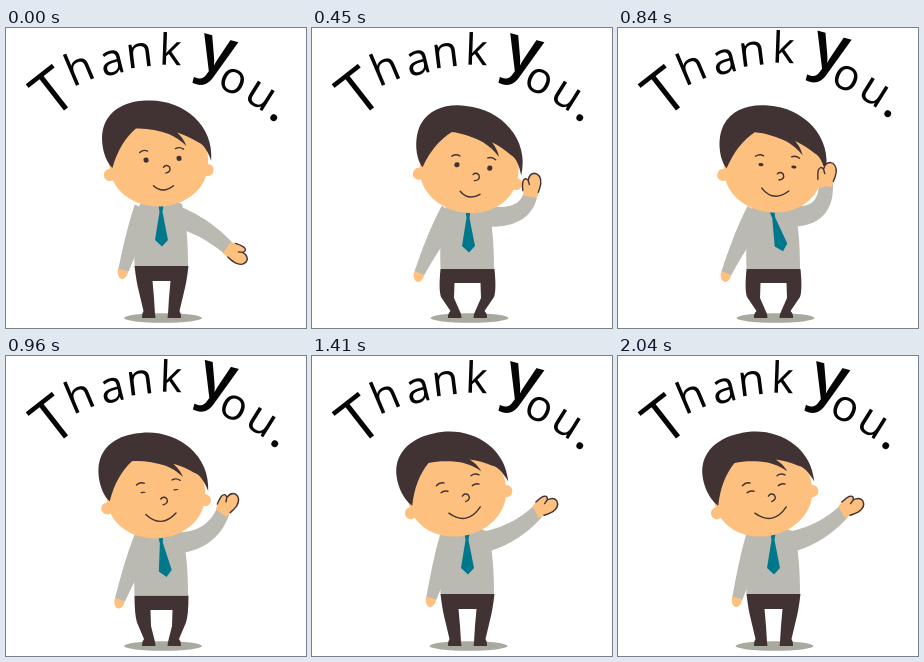
Recreate the animation shown at these times as an HTML page. Size 300 px wide and 300 px high, loop 2070 ms.

```html
<!DOCTYPE html>
<html lang="en">
<head>
<meta charset="utf-8">
<title>Thank You</title>
<style>
html, body { margin: 0; width: 100%; height: 100%; overflow: hidden; background: #fff; }
svg { display: block; width: 100vw; height: 100vh; }
text { font-family: "Open Sans", "Noto Sans", sans-serif; text-anchor: middle; fill: #050505; }
.skin { fill: #fdc07e; }
.dark { fill: #413233; }
.shirt { fill: #babab2; }
.line { fill: none; stroke: #413233; stroke-width: 1.4; stroke-linecap: round; stroke-linejoin: round; }
</style>
</head>
<body>
<svg viewBox="0 0 300 300">
  <ellipse id="shadow" cy="290" rx="39" ry="4.8" fill="#a8a99f"/>
  <path id="legs" class="dark"/>
  <ellipse id="leftHand" class="skin" rx="5.2" ry="8"/>
  <path id="leftArm" class="shirt"/>
  <path id="rightArm" class="shirt"/>
  <path id="torso" class="shirt"/>
  <path id="tie" fill="#00788c" d="M-2.5 -4H2.5L1.5 3L7 31L1 37.5L-6 31L-1.5 3Z"/>
  <g id="head">
    <circle class="skin" cx="-49" cy="14" r="6"/>
    <circle class="skin" cx="49" cy="14" r="6"/>
    <path class="skin" d="M-49 4C-49 -30 -28 -49 0 -49S50 -30 50 4C50 32 26 48 1 48S-49 32 -49 4Z"/>
    <path class="dark" d="M-46 7C-54 -1 -58 -22 -52 -36C-45 -52 -28 -59 -9 -58.5C26 -59 58 -32 53 5C50 -5 46 -12 41 -14C34 -19 28 -22 20.5 -25C25 -20 27 -17 29 -11C24 -17 18 -21 12 -24C2 -28 -10 -31 -20.5 -31C-32 -22 -40 -10 -46 7Z"/>
    <path class="line" d="M-18 -7Q-14 -10 -10 -8M18 -9Q22 -11 26 -8"/>
    <g id="open" class="dark"><ellipse cx="-12" cy="1" rx="2.6" ry="2.6"/><ellipse cx="21" cy="1" rx="2.6" ry="2.6"/></g>
    <path id="shut" class="line" d="M-15 1Q-12 -1 -8 1M17 1Q21 -1 24 1"/>
    <path class="line" d="M5 9Q8 6 11 9Q13 14 7 15"/>
    <path id="mouth" class="line"/>
  </g>
  <g id="hand">
    <path class="skin" d="M-4 -6.5Q4 -10 10 -10Q15 -9 12 -5Q19 -5 20 0Q20 7 11 8Q4 8 -4 6.5Z"/>
    <path class="line" d="M1 -8.5Q6 -10 10 -10Q15 -9 12 -5Q19 -5 20 0Q20 7 11 8Q6 8 2 7M12 -5L8 -3"/>
  </g>
  <g id="words"></g>
</svg>
<script>
const LOOP = 2070, STEP = 30;
const $ = id => document.getElementById(id);
const set = (el, attrs) => { for (const k in attrs) el.setAttribute(k, attrs[k]); };

// letter, baseline x, y, turn, size, weight
const letters = [
  ["T", 60, 81, -38, 62, 500], ["h", 79, 54, -23, 44, 500], ["a", 109, 46, -14, 44, 500],
  ["n", 135, 39, -7, 44, 500], ["k", 164, 37, 2, 43, 500], ["y", 206, 44, 15, 66, 600],
  ["o", 222, 64, 24, 44, 500], ["u", 248, 78, 32, 44, 500], [".", 266, 92, 36, 46, 600]
].map(([ch, x, y, turn, size, weight]) => {
  const el = document.createElementNS("http://www.w3.org/2000/svg", "text");
  el.textContent = ch;
  set(el, { "font-size": size, "font-weight": weight });
  $("words").append(el);
  return { el, x, y, turn };
});

const poses = [
  { t: 0,    head: [152, 130.5, -3],   arm: [172, 189, 202, 200, 224, 222], hand: 33,  left: [117, 243], hip: 238, bend: 0,  tie: [155, 181, 0],   eye: 1,  smile: 0,  ground: 157, text: [0, 0, 0, 0] },
  { t: 210,  head: [154, 134, 2],      arm: [172, 189, 202, 193, 231, 190], hand: -14, left: [112, 245], hip: 240, bend: .5, tie: [155, 184, 0],   eye: 1,  smile: 0,  ground: 157, text: [-4, 0, 0, 0] },
  { t: 450,  head: [157, 137, 6],      arm: [172, 188, 213, 193, 219, 165], hand: -80, left: [107, 246], hip: 241, bend: 1,  tie: [156, 187, 0],   eye: 1,  smile: 0,  ground: 157.5, text: [0, 0, 0, 0] },
  { t: 840,  head: [155, 136.5, 4],    arm: [172, 188, 209, 191, 208, 154], hand: -78, left: [108, 246], hip: 241, bend: 1,  tie: [155, 187, -14], eye: .6, smile: .6, ground: 157.5, text: [0, 0, 2, -4] },
  { t: 1080, head: [143.5, 132.5, -13], arm: [172, 186, 205, 178, 227, 154], hand: -28, left: [119, 243], hip: 238, bend: 0,  tie: [155, 181, 0],   eye: 0,  smile: 1,  ground: 156.5, text: [0, 0, 0, 0] }
];

// monotone cubic through the poses: flows through passing values, rests at turning points
function ease(key, i, j, t) {
  const val = n => j === null ? poses[n][key] : poses[n][key][j];
  const slope = n => n < 0 || n > poses.length - 2 ? 0 : (val(n + 1) - val(n)) / (poses[n + 1].t - poses[n].t);
  const tangent = n => {
    const a = n ? slope(n - 1) : slope(0), b = slope(n);
    return a * b > 0 ? 2 * a * b / (a + b) : 0;
  };
  const h = poses[i + 1].t - poses[i].t, u = (t - poses[i].t) / h, v = 1 - u;
  return v * v * (1 + 2 * u) * val(i) + u * u * (1 + 2 * v) * val(i + 1) + h * u * v * (v * tangent(i) - u * tangent(i + 1));
}

function poseAt(t) {
  const i = poses.findIndex(p => p.t > t) - 1;
  if (i < 0) return poses[poses.length - 1];
  const out = {};
  for (const k in poses[i]) {
    const v = poses[i][k];
    out[k] = Array.isArray(v) ? v.map((_, j) => ease(k, i, j, t)) : ease(k, i, null, t);
  }
  return out;
}

// tapered limb along a quadratic curve
function limb([ax, ay, bx, by, cx, cy], w0, w1) {
  const one = [], two = [], n = 16;
  for (let i = 0; i <= n; i++) {
    const u = i / n, v = 1 - u;
    const x = v * v * ax + 2 * u * v * bx + u * u * cx;
    const y = v * v * ay + 2 * u * v * by + u * u * cy;
    const dx = v * (bx - ax) + u * (cx - bx), dy = v * (by - ay) + u * (cy - by);
    const r = (w0 + (w1 - w0) * u) / 2 / Math.hypot(dx, dy);
    one.push([x - dy * r, y + dx * r]);
    two.unshift([x + dy * r, y - dx * r]);
  }
  return "M" + one.concat(two).map(p => p.map(v => v.toFixed(2)).join(" ")).join("L") + "Z";
}

const place = (el, [x, y, turn]) => set(el, { transform: `translate(${x} ${y}) rotate(${turn})` });

function leg(side, hip, b) {
  const x = d => 155.5 + side * d;
  return `M${x(0)} ${hip}H${x(27)}Q${x(25 + 4 * b)} ${255 + 7 * b} ${x(22.5 + 4 * b)} ${264 + 5 * b}L${x(18 - b)} 283` +
    `Q${x(20)} 286 ${x(19.5)} 290H${x(6)}L${x(6.5)} 286L${x(7.5 + 6 * b)} 270L${x(9 + 4 * b)} ${253 + 2 * b}H${x(0)}Z`;
}

function draw(t) {
  const p = poseAt(t), hip = p.hip, [lx, ly] = p.left, [wx, wy] = p.arm.slice(4);

  set($("shadow"), { cx: p.ground });
  set($("legs"), { d: leg(-1, hip, p.bend) + leg(1, hip, p.bend) });
  set($("torso"), { d: `M134 ${hip - 62}Q156 ${hip - 72} 176 ${hip - 62}Q182 ${hip - 40} 182 ${hip}H128.5Q127 ${hip - 42} 134 ${hip - 62}Z` });
  set($("leftHand"), { cx: lx, cy: ly, transform: `rotate(10 ${lx} ${ly})` });
  set($("leftArm"), { d: limb([140, hip - 56, (140 + lx) / 2, (hip - 56 + ly) / 2 - 7, lx + .5, ly - 1], 25, 10.5) });
  set($("rightArm"), { d: limb(p.arm, 21, 13.5) });
  place($("tie"), p.tie);
  place($("head"), p.head);
  place($("hand"), [wx, wy, p.hand]);

  const awake = p.eye > .25;
  for (const e of $("open").children) set(e, { ry: 2.6 * p.eye });
  set($("open"), { opacity: awake ? 1 : 0 });
  set($("shut"), { opacity: awake ? 0 : 1 });
  const w = 10 + 6 * p.smile, my = 27 - 4.5 * p.smile;
  set($("mouth"), { d: `M${4 - w} ${my}Q3 ${my + 9 + 8 * p.smile} ${4 + w} ${my + 1}` });

  const [x0, y0, x1, y1] = p.text;
  letters.forEach((c, i) => {
    const u = i / (letters.length - 1);
    place(c.el, [c.x + x0 + (x1 - x0) * u, c.y + y0 + (y1 - y0) * u, c.turn]);
  });
}

const start = performance.now();
function tick(now) {
  const t = Math.max(0, now - start) % LOOP;
  draw(Math.floor(t / STEP) * STEP);
  requestAnimationFrame(tick);
}
draw(0);
requestAnimationFrame(tick);
</script>
</body>
</html>
```
